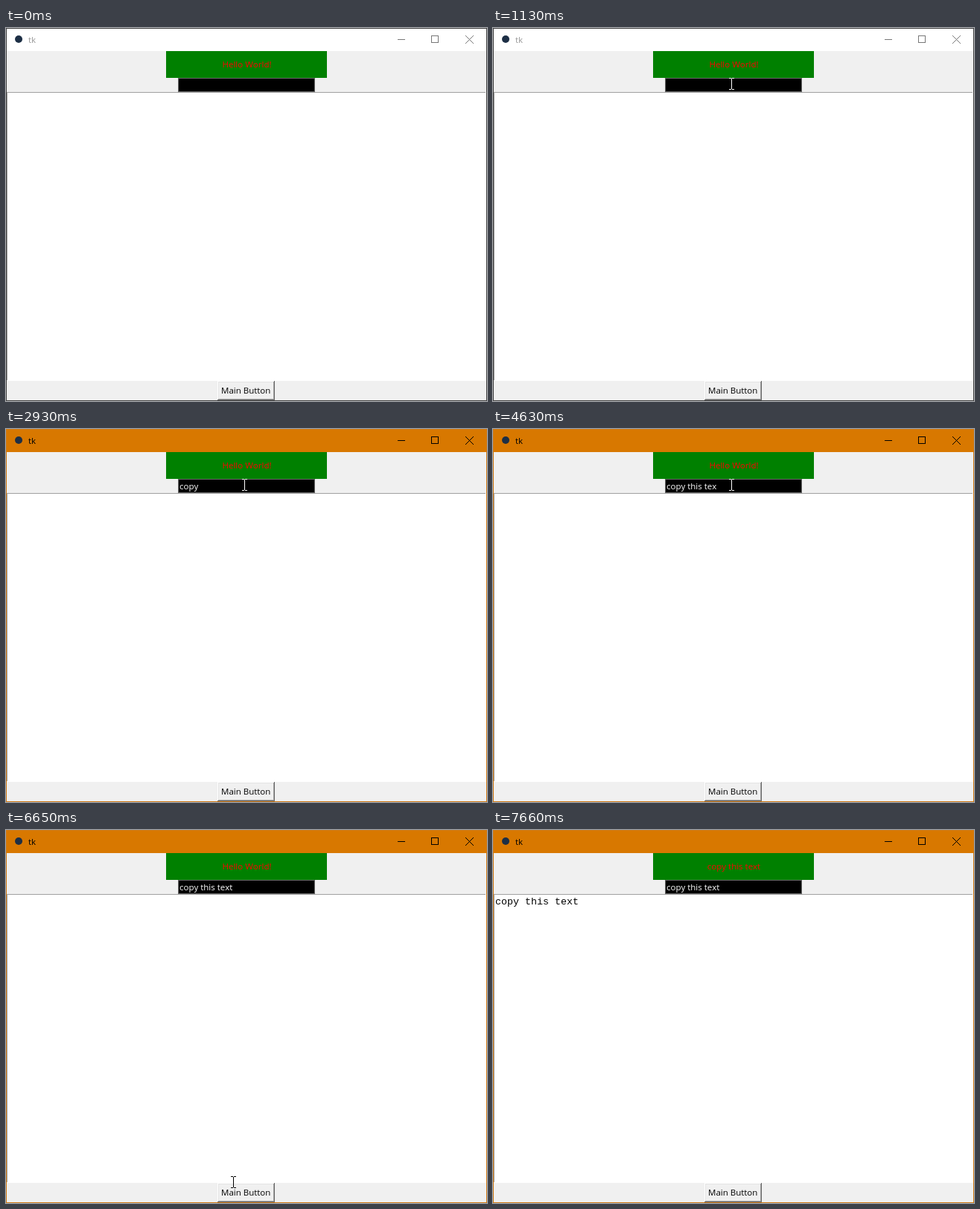
An HTML page with a canvas for the animation above (8 s loop, 646 by 501 pixels).

```html
<!DOCTYPE html>
<html lang="en">
<head>
<meta charset="utf-8">
<title>tk</title>
<style>
  html, body { margin: 0; width: 100%; height: 100%; overflow: hidden; }
  canvas { display: block; }
</style>
</head>
<body>
<canvas id="stage" width="646" height="501"></canvas>
<script>
const ctx = document.getElementById('stage').getContext('2d', { alpha: false });
const LOOP = 8000;
const UI = '11.5px "Open Sans", sans-serif';
const MONO = '13.333px "Liberation Mono", monospace';
const PHRASE = 'copy this text';
const FOCUS = 1450, BLUR_GLOW = 1680, PRESS = 7030, RELEASE = 7110;

// Each word is typed at an even pace; its leading space comes with the first letter
const words = [
  { word: 'copy', start: 2230, pace: 233 },
  { word: ' this', start: 3490, pace: 150 },
  { word: ' text', start: 4250, pace: 183 }
];

// The pointer glides from stop to stop, slowing down, on a path bent sideways
const ENTER = { x: 576, y: 612 };
const stops = [
  { start: 70, end: 210, x: 441, y: 229, bend: 0 },
  { start: 440, end: 1130, x: 320, y: 75, bend: 0.35 },
  { start: 5510, end: 5650, x: 317, y: 209, bend: 0.05 },
  { start: 5880, end: 6040, x: 338, y: 424, bend: 0 },
  { start: 6270, end: 6880, x: 297, y: 485, bend: 0 },
  { start: 7510, end: 7660, x: 476, y: 515, bend: 0.29 }
];
const SAMPLE = 76;
const arrow = new Path2D('M0 0V16L4 12.5 6.5 18 9 17 6.5 11.5H11Z');

function rect(color, x, y, w, h) {
  ctx.fillStyle = color;
  ctx.fillRect(x, y, w, h);
}

function text(str, x, y, color, font = UI, align = 'left') {
  ctx.font = font;
  ctx.fontKerning = 'none';
  ctx.textAlign = align;
  ctx.fillStyle = color;
  ctx.fillText(str, x, y);
}

function disc(color, x, y, r) {
  ctx.fillStyle = color;
  ctx.beginPath();
  ctx.arc(x, y, r, 0, Math.PI * 2);
  ctx.fill();
}

function bevel(x, y, w, h, light, dark) {
  rect(dark, x, y + h - 1, w, 1);
  rect(dark, x + w - 1, y, 1, h);
  rect(light, x, y, w - 1, 1);
  rect(light, x, y, 1, h - 1);
}

function drawWindow(active) {
  rect(active ? '#cf7a16' : '#424242', 0, 0, 646, 501);
  rect(active ? '#d87800' : '#fff', 1, 1, 644, 30);
  rect('#f0f0f0', 1, 31, 644, 469);

  disc('#1d2f45', 17, 15, 5);
  text('tk', 30, 20, active ? '#000' : '#999');

  const glyph = active ? '#000' : '#777';
  rect(glyph, 526, 15, 10, 1);
  ctx.strokeStyle = glyph;
  ctx.lineWidth = 1;
  ctx.strokeRect(571.5, 10.5, 9, 9);
  ctx.beginPath();
  ctx.moveTo(617, 10);
  ctx.lineTo(628, 21);
  ctx.moveTo(628, 10);
  ctx.lineTo(617, 21);
  ctx.stroke();
}

function typedText(t) {
  return words.map(({ word, start, pace }) => {
    if (t < start) return '';
    const letters = Math.floor((t - start) / pace + 0.02) + 1;
    return word.slice(0, letters + (word[0] === ' ' ? 1 : 0));
  }).join('');
}

function drawButton(pressed) {
  const shift = pressed ? 1 : 0;
  if (pressed) {
    bevel(284, 474, 77, 26, '#a0a0a0', '#fff');
    bevel(285, 475, 75, 24, '#696969', '#e3e3e3');
  } else {
    bevel(284, 474, 77, 26, '#fff', '#696969');
    bevel(285, 475, 75, 24, '#e3e3e3', '#a0a0a0');
  }
  text('Main Button', 289 + shift, 491 + shift, '#000');
}

function drawWidgets(t) {
  const done = t >= RELEASE;
  rect('#008000', 215, 31, 216, 36);
  text(done ? PHRASE : 'Hello World!', 323.5, 53, '#f00', UI, 'center');

  rect('#000', 231, 67, 184, 19);
  bevel(231, 67, 184, 19, '#696969', '#696969');
  text(typedText(t), 233, 81, '#fff');

  rect('#fff', 1, 86, 644, 388);
  bevel(1, 86, 644, 388, '#a0a0a0', '#fff');
  if (done) text(PHRASE, 3, 100, '#000', MONO);

  drawButton(t >= PRESS && t < RELEASE);
}

function pointerAt(t) {
  const i = stops.findLastIndex(stop => t >= stop.start);
  const from = stops[i - 1] || ENTER, to = stops[i];
  const gaps = Math.round((to.end - to.start) / SAMPLE);
  const step = Math.floor((t - to.start) / (to.end - to.start) * gaps + 1e-6) + 1;
  const s = Math.min(1, step / (gaps + 1));
  const ease = 1 - (1 - s) ** 2;
  const bulge = 2 * s * (1 - s) * to.bend;
  const dx = to.x - from.x, dy = to.y - from.y;
  return [
    Math.round(from.x + dx * ease + dy * bulge),
    Math.round(from.y + dy * ease - dx * bulge)
  ];
}

function drawBeam(x, y) {
  const color = y < 86 ? '#fff' : '#000';
  for (const row of [y - 8, y + 7]) {
    rect(color, x - 3, row, 3, 1);
    rect(color, x + 1, row, 3, 1);
  }
  rect(color, x, y - 7, 1, 14);
}

function drawArrow(x, y) {
  ctx.save();
  ctx.translate(x + 0.5, y + 0.5);
  ctx.lineJoin = 'round';
  ctx.fillStyle = '#fff';
  ctx.fill(arrow);
  ctx.strokeStyle = '#000';
  ctx.stroke(arrow);
  ctx.restore();
}

function drawPointer(t) {
  if (t < stops[0].start || t >= stops.at(-1).end) return;
  const glow = 'rgba(255, 255, 0, 0.5)';
  if (t >= FOCUS && t < BLUR_GLOW) disc(glow, 318, 74, 11.5);
  if (t >= PRESS && t < RELEASE) disc(glow, 297, 486, 11.5);
  const [x, y] = pointerAt(t);
  (y < 474 ? drawBeam : drawArrow)(x, y);
}

function frame() {
  const t = performance.now() % LOOP;
  drawWindow(t >= FOCUS);
  drawWidgets(t);
  drawPointer(t);
  requestAnimationFrame(frame);
}
frame();
</script>
</body>
</html>
```
